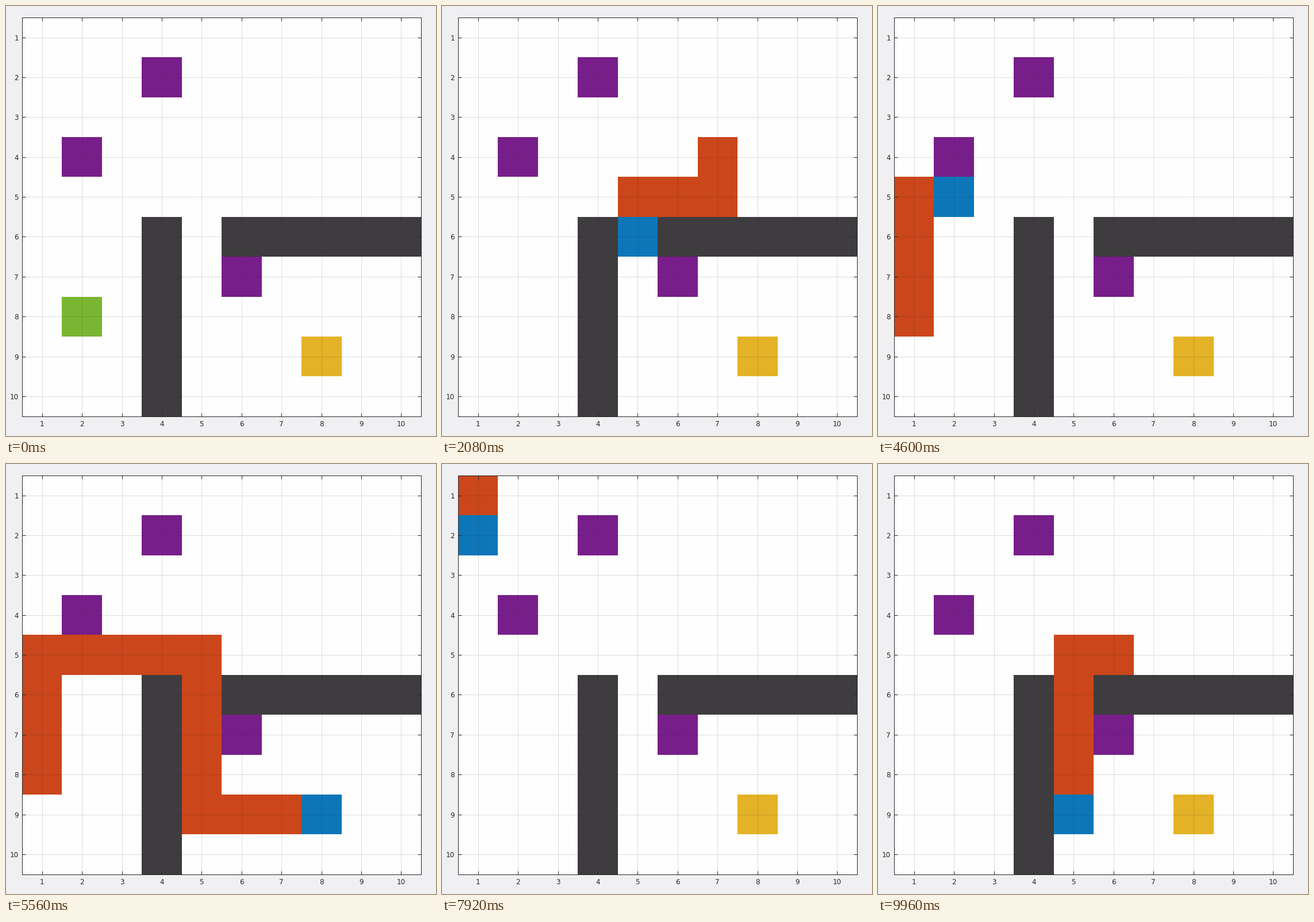
Animation of 748x748 px, one loop 10 s. Source, as a matplotlib script:

```python
import numpy as np
import matplotlib.pyplot as plt
from matplotlib.animation import FuncAnimation

SIZE, DPI = 748, 100
FRAMES, INTERVAL = 250, 40
PX = 72 / DPI                      # points per pixel

FREE, WALL, TRAP = (254, 254, 254), (62, 60, 62), (120, 30, 138)
START, GOAL = (122, 182, 50), (227, 178, 38)
AGENT, TRAIL = (12, 118, 184), (203, 70, 27)
INK = "#262626"

STEP = 91.3                        # ms per move
WAIT = 316                         # ms on the start cell before moving
FIRST_MOVE = 230.9                 # ms of the first move in the loop

# Corner cells (column, row) of each walk; all end on the goal.
TAIL = [(5, 5), (5, 9), (8, 9)]
WALKS = [
    [(2, 8), (3, 8), (3, 5)] + TAIL,
    [(7, 4), (7, 5)] + TAIL,
    [(1, 5)] + TAIL,
    [(1, 8), (1, 5)] + TAIL,
    [(7, 7), (7, 9), (8, 9)],
    [(5, 7), (5, 9), (8, 9)],
    [(10, 10), (10, 9), (8, 9)],
    [(1, 1), (1, 5)] + TAIL,
    [(6, 5)] + TAIL,
]


def cells(corners):
    """Every cell passed on the way through the corners."""
    path = [corners[0]]
    for cx, cy in corners[1:]:
        while path[-1] != (cx, cy):
            x, y = path[-1]
            path.append((x + int(np.sign(cx - x)), y + int(np.sign(cy - y))))
    return path


def schedule():
    """List of (reset time, path) for all walks."""
    out, t = [], FIRST_MOVE - WAIT
    for corners in WALKS:
        path = cells(corners)
        out.append((t, path))
        t += WAIT + (len(path) - 1) * STEP
    return out


def paint(grid, x, y, color):
    grid[y - 1, x - 1] = color


def make_world():
    grid = np.full((10, 10, 3), FREE, dtype=np.uint8)
    grid[5:, 3] = WALL
    grid[5, 5:] = WALL
    for x, y in [(4, 2), (2, 4), (6, 7)]:
        paint(grid, x, y, TRAP)
    paint(grid, 8, 9, GOAL)
    return grid


WORLD = make_world()
PLAN = schedule()


def world_at(ms):
    t0, path = [p for p in PLAN if p[0] <= ms][-1]
    moved = int(np.floor((ms - t0 - WAIT) / STEP)) + 1
    moved = min(max(moved, 0), len(path) - 1)
    grid = WORLD.copy()
    for x, y in path[:moved]:
        paint(grid, x, y, TRAIL)
    paint(grid, *path[moved], AGENT if moved else START)
    return grid


fig = plt.figure(figsize=(SIZE / DPI, SIZE / DPI), dpi=DPI, facecolor="#f0eff1")
plt.rcParams["font.family"] = "DejaVu Sans"
left, right, top, bottom = 28, 722, 20, 713.6
ax = fig.add_axes([left / SIZE, 1 - bottom / SIZE,
                   (right - left) / SIZE, (bottom - top) / SIZE])
image = ax.imshow(WORLD, interpolation="nearest", aspect="auto",
                  extent=(0.5, 10.5, 10.5, 0.5))

ax.set_axisbelow(False)
ax.set_xticks(range(1, 11))
ax.set_yticks(range(1, 11))
ax.tick_params(direction="in", top=True, right=True, length=6 * PX, width=PX,
               color=INK, labelcolor=INK, labelsize=12 * PX)
ax.tick_params(axis="x", pad=7.5 * PX)
ax.tick_params(axis="y", pad=6 * PX)
ax.grid(color=INK, alpha=0.15, linewidth=PX)
for spine in ax.spines.values():
    spine.set(color=INK, linewidth=PX)


def update(i):
    image.set_data(world_at(i * INTERVAL))
    return [image]


anim = FuncAnimation(fig, update, frames=FRAMES, interval=INTERVAL,
                     repeat=True, repeat_delay=0, blit=False)
plt.show()
```
